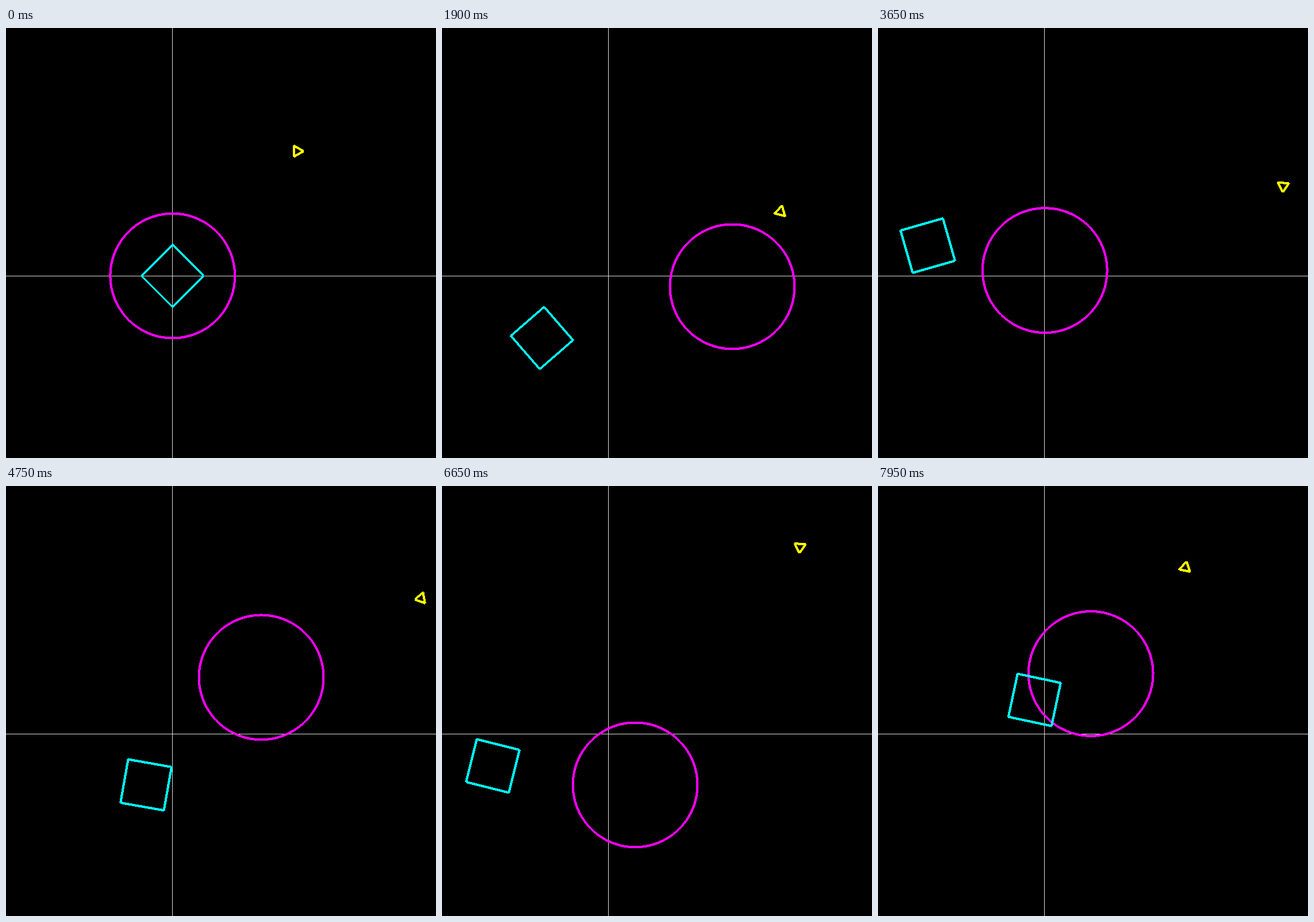
Write a matplotlib script that moves like this. It is 748 by 748 pixels and loops after 8 s.

```python
import numpy as np
import matplotlib.pyplot as plt
from matplotlib.animation import FuncAnimation
from matplotlib.patches import PathPatch
from matplotlib.path import Path

SIZE, DPI = 748, 64
UNIT = 54.2                      # pixels per world unit
ORIGIN = 289.8 + 431.1j          # world origin on the stage, y downwards
FRAMES, INTERVAL = 160, 50
STROKE = 3

plt.rcParams["toolbar"] = "None"
fig = plt.figure(figsize=(SIZE / DPI, SIZE / DPI), dpi=DPI, facecolor="black")
ax = fig.add_axes([0, 0, 1, 1])
ax.set_xlim(0, SIZE)
ax.set_ylim(SIZE, 0)
ax.axis("off")


def ngon(sides, radius):
    a = np.linspace(0, 2 * np.pi, sides + 1)
    return radius * np.exp(1j * a)


def outline(z):
    """Hard-edged stroke, widened straight across each segment's minor axis."""
    a, d = z[:-1], np.diff(z)
    side = np.where(abs(d.real) >= abs(d.imag), 1j, 1) * STROKE / 2
    # same winding everywhere, so neighbouring pieces merge
    side = np.where((d.conj() * side).imag < 0, -side, side)
    quads = np.stack([a - side, a + d - side, a + d + side, a + side], axis=1)
    xy = np.stack([quads.real, quads.imag], axis=-1)
    return Path.make_compound_path_from_polys(xy)


class Orbiter:
    """Shape that circles a centre and turns along with its orbit."""

    def __init__(self, shape, color, center, start, step):
        self.shape, self.center = shape, center
        self.start, self.step = start, step
        self.patch = PathPatch(self.path(0), facecolor=color,
                               edgecolor="none", lw=0, antialiased=False,
                               snap=False, zorder=3)
        ax.add_patch(self.patch)

    def path(self, frame):
        turn = np.exp(1j * np.radians(self.step * frame))
        z = self.center + turn * (self.start + self.shape)
        return outline(ORIGIN + UNIT * z.conj())

    def place(self, frame):
        self.patch.set_path(self.path(frame))
        return self.patch


axis_style = dict(color="#dcdcdc", lw=72 / DPI, antialiased=False, snap=True)
ax.plot([0, SIZE], [431, 431], **axis_style)
ax.plot([289, 289], [0, SIZE], **axis_style)

orbiters = [
    Orbiter(ngon(100, 2), "#ff00ff", center=2, start=-2, step=-5),
    Orbiter(ngon(4, 1), "#00ffff", center=-2, start=2, step=7),
    Orbiter(ngon(3, 0.2), "#ffff00", center=6 + 4j, start=-2, step=2),
]


def update(frame):
    return [o.place(frame) for o in orbiters]


anim = FuncAnimation(fig, update, frames=FRAMES, interval=INTERVAL,
                     repeat=True, repeat_delay=0, blit=False)
plt.show()
```
